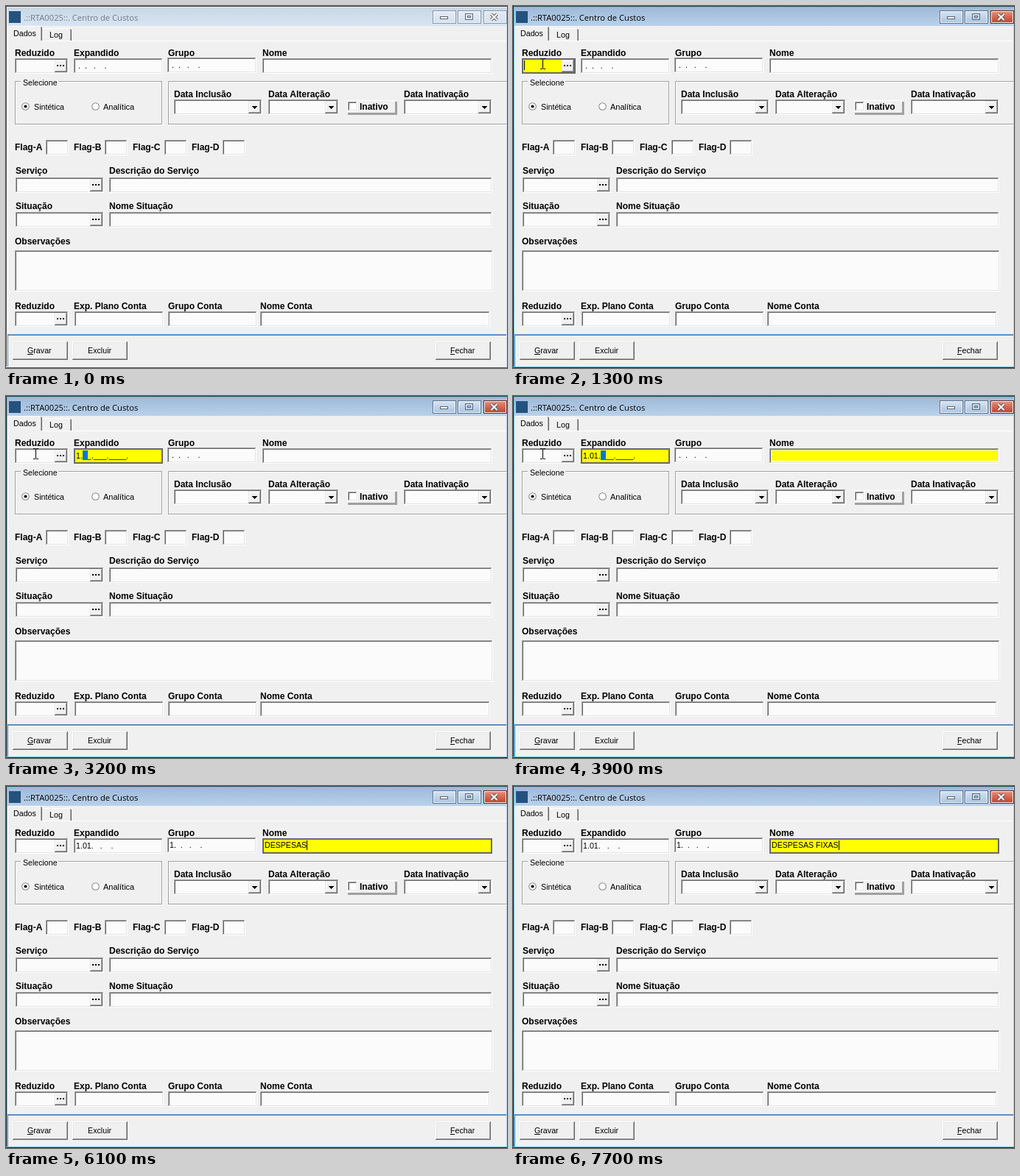
Animation of 680x492 px, one loop 8 s. Source, as an HTML page with a canvas:

```html
<!DOCTYPE html>
<html lang="pt">
<head>
<meta charset="utf-8">
<title>Centro de Custos</title>
<style>
html, body { margin: 0; width: 100%; height: 100%; overflow: hidden; background: #f0f0f0; }
canvas { display: block; }
</style>
</head>
<body>
<canvas id="stage" width="680" height="492"></canvas>
<script>
const ctx = document.getElementById('stage').getContext('2d');
const SANS = '"Liberation Sans", Arial, sans-serif';
const BOLD = `bold 12px ${SANS}`;
const PLAIN = `10.7px ${SANS}`;
const ENTRY = `10.6px ${SANS}`;
const TITLE = '11.2px "Open Sans", sans-serif';
const FACE = '#f0f0f0', PAPER = '#fbfbfb', YELLOW = '#ffff00', BLUE = '#0078d7';
const GREY = '#a0a0a0', DARK = '#696969', LIGHT = '#e3e3e3';

function box(x0, y0, x1, y1, color) {
  ctx.fillStyle = color;
  ctx.fillRect(x0, y0, x1 - x0, y1 - y0);
}

function text(str, x, y, font = BOLD, color = '#000') {
  ctx.font = font;
  ctx.fillStyle = color;
  ctx.fillText(str, x, y);
}

// One-pixel bevel ring: top/left in one colour, bottom/right in another.
function bevel(x0, y0, x1, y1, topLeft, bottomRight) {
  box(x0, y0, x1, y0 + 1, topLeft);
  box(x0, y0, x0 + 1, y1, topLeft);
  box(x0, y1 - 1, x1, y1, bottomRight);
  box(x1 - 1, y0, x1, y1, bottomRight);
}

function raised(x0, y0, x1, y1, outer = '#fff', inner = LIGHT) {
  box(x0, y0, x1, y1, FACE);
  bevel(x0, y0, x1, y1, outer, DARK);
  bevel(x0 + 1, y0 + 1, x1 - 1, y1 - 1, inner, GREY);
}

function field(x0, y0, x1, y1, { fill = PAPER, focus = false } = {}) {
  box(x0, y0, x1, y1, fill);
  bevel(x0, y0, x1, y1, focus ? DARK : GREY, focus ? DARK : '#fff');
  bevel(x0 + 1, y0 + 1, x1 - 1, y1 - 1, DARK, focus ? DARK : LIGHT);
}

// A field with a 17-pixel square button inside its right end.
function buttonField(x0, y0, x1, style) {
  field(x0, y0, x1, y0 + 21, style);
  raised(x1 - 19, y0 + 2, x1 - 2, y0 + 19, LIGHT, '#fff');
}

function lookup(x0, y0, x1, style) {
  buttonField(x0, y0, x1, style);
  for (let i = 0; i < 3; i++) box(x1 - 16 + i * 4, y0 + 9, x1 - 14 + i * 4, y0 + 11, '#000');
}

function combo(x0, x1) {
  buttonField(x0, 127, x1);
  for (let i = 0; i < 4; i++) box(x1 - 14 + i, 136 + i, x1 - 7 - i, 137 + i, '#000');
}

function etched(x0, y0, x1, y1) {
  ctx.lineWidth = 1;
  ctx.strokeStyle = '#fff';
  ctx.strokeRect(x0 + 1.5, y0 + 1.5, x1 - x0 - 2, y1 - y0 - 2);
  ctx.strokeStyle = GREY;
  ctx.strokeRect(x0 + .5, y0 + .5, x1 - x0 - 2, y1 - y0 - 2);
}

function radio(x, y, checked) {
  const disc = (r, color) => {
    ctx.beginPath();
    ctx.arc(x, y, r, 0, 7);
    ctx.fillStyle = color;
    ctx.fill();
  };
  disc(5.3, '#858585');
  disc(4.3, '#fff');
  if (checked) disc(2, '#000');
}

function button(x, label, textX, underline) {
  raised(x, 456, x + 75, 481);
  text(label, textX, 472, PLAIN);
  if (underline) box(textX, 473, textX + underline, 474, '#000');
}

function captionButton(x0, x1, color, border) {
  box(x0, 6, x1, 24, border);
  box(x0 + 1, 7, x1 - 1, 23, '#f3f7fb');
  const shade = ctx.createLinearGradient(0, 8, 0, 22);
  shade.addColorStop(0, color[0]);
  shade.addColorStop(1, color[1]);
  box(x0 + 2, 8, x1 - 2, 22, shade);
}

function cross(color, width) {
  ctx.strokeStyle = color;
  ctx.lineWidth = width;
  ctx.beginPath();
  ctx.moveTo(658.5, 11); ctx.lineTo(666.5, 19);
  ctx.moveTo(666.5, 11); ctx.lineTo(658.5, 19);
  ctx.stroke();
}

function drawWindow(active) {
  const [top, base] = active ? ['#9db9d8', '#b9d1ea'] : ['#c9d6e4', '#d7e4f2'];
  const glow = active ? '#58c8e4' : '#eef4fa';
  const edge = active ? '#2b2b2b' : '#565656';
  box(0, 0, 680, 492, FACE);
  const bar = ctx.createLinearGradient(0, 1, 0, 27);
  bar.addColorStop(0, top);
  bar.addColorStop(1, base);
  box(0, 0, 680, 27, bar);
  box(0, 0, 680, 1, '#404040');
  box(0, 1, 680, 2, glow);
  box(0, 1, 1, 492, edge);
  box(1, 2, 2, 490, glow);
  box(679, 2, 680, 490, base);
  box(0, 490, 680, 491, glow);
  box(0, 491, 680, 492, edge);

  box(4, 7, 20, 23, '#24527e');
  text('.::RTA0025::. Centro de Custos', 24, 20, TITLE, active ? '#000' : '#737c86');

  const face = active ? ['#d3e2f2', '#adc6e0'] : ['#e3ebf4', '#d5e1ee'];
  const border = active ? '#5d7188' : '#8795a5';
  captionButton(579, 611, face, border);
  captionButton(613, 645, face, border);
  captionButton(648, 680, active ? ['#e58a75', '#c5442d'] : face, active ? '#66241c' : border);
  box(589, 14, 600, 18, '#59636e');
  box(590, 15, 599, 17, '#fff');
  ctx.lineWidth = 1;
  ctx.strokeStyle = '#626c78';
  ctx.strokeRect(623.5, 10.5, 10, 8);
  ctx.strokeRect(626.5, 13.5, 4, 2);
  cross('#59535a', 4);
  cross('#fff', 2.2);
}

function drawForm() {
  // Tabs and page edges
  box(2, 47, 679, 48, '#fff');
  box(3, 28, 47, 48, FACE);
  box(4, 27, 47, 28, '#fff');
  box(2, 28, 3, 446, '#fff');
  box(48, 29, 49, 47, DARK);
  box(47, 28, 48, 47, GREY);
  box(49, 30, 87, 31, '#fff');
  box(88, 32, 89, 47, DARK);
  box(87, 31, 88, 47, GREY);
  text('Dados', 10, 41, PLAIN);
  text('Log', 59, 43, PLAIN);
  box(2, 446, 679, 448, '#5b8fc4');
  box(2, 448, 3, 490, '#5b8fc4');

  const labels = [
    ['Reduzido', 12, 68], ['Expandido', 92, 68], ['Grupo', 220, 68], ['Nome', 348, 68],
    ['Serviço', 13, 228], ['Descrição do Serviço', 140, 228],
    ['Situação', 13, 276], ['Nome Situação', 140, 276], ['Observações', 12, 324],
    ['Reduzido', 12, 412], ['Exp. Plano Conta', 92, 412],
    ['Grupo Conta', 220, 412], ['Nome Conta', 345, 412]
  ];

  etched(12, 102, 213, 162);
  box(20, 101, 71, 106, FACE);
  text('Selecione', 23, 108, ENTRY);
  radio(26.5, 136.5, true);
  radio(121.5, 136.5, false);
  text('Sintética', 38, 141, PLAIN);
  text('Analítica', 132, 141, `11px ${SANS}`);

  etched(220, 102, 690, 162);
  labels.push(['Data Inclusão', 228, 124], ['Data Alteração', 356, 124], ['Data Inativação', 540, 124]);
  combo(228, 348);
  combo(356, 452);
  combo(540, 660);
  box(463, 128, 531, 129, '#fff');
  box(463, 128, 464, 145, '#fff');
  box(464, 145, 531, 148, GREY);
  box(528, 130, 531, 148, GREY);
  field(464, 130, 477, 143, { fill: '#fff' });
  labels.push(['Inativo', 480, 141]);

  [54, 134, 215, 294].forEach((x, i) => {
    labels.push(['Flag-' + 'ABCD'[i], 12 + i * 80, 196]);
    field(x, 182, x + 31, 203);
  });
  for (const y of [233, 280]) {
    lookup(13, y, 133);
    field(140, y, 660, y + 21);
  }
  field(12, 332, 661, 388);
  lookup(12, 415, 85);
  field(93, 415, 214, 436);
  field(220, 415, 341, 436);
  field(345, 415, 657, 436);
  for (const [str, x, y] of labels) text(str, x, y);

  button(9, 'Gravar', 29, 8);
  button(90, 'Excluir', 111, 0);
  button(583, 'Fechar', 603, 6);
}

const BLANK = ' .  .   .    .';
// [time, text, x of the selected cell]
const maskSteps = [
  [0, BLANK], [2600, '_.__.___.____.', 95], [2700, '1.__.___.____.'],
  [3200, '1.__.___.____.', 104], [3300, '1.0_.___.____.', 110],
  [3600, '1.01.___.____.', 119], [4000, '1.01.   .    .']
];
const typingTimes = [4900, 5000, 5200, 5300, 5500, 5800, 5900, 6100, 6800, 7000, 7200, 7500, 7600, 7700];
const NAME = 'DESPESAS FIXAS';

const during = (t, from, to) => t >= from && t < to;

function caret(x) {
  box(Math.round(x), 74, Math.round(x) + 1, 87, '#000');
}

function drawEntries(t) {
  const inCode = during(t, 1200, 2100);
  lookup(12, 71, 85, { fill: inCode ? YELLOW : PAPER, focus: inCode });
  if (during(t, 1200, 1800)) caret(15);

  const inMask = during(t, 2100, 4000);
  field(92, 71, 213, 92, { fill: inMask ? YELLOW : PAPER, focus: inMask });
  const [, mask, selected] = maskSteps.filter(step => step[0] <= t).pop();
  text(mask, 95, 85, PLAIN);
  if (selected) box(selected, 74, selected + 7, 87, BLUE);

  field(219, 70, 340, 91);
  text(t < 4900 ? BLANK : '1' + BLANK.slice(1), 222, 84, PLAIN);

  const inName = t >= 4000;
  field(348, 71, 660, 92, { fill: inName ? YELLOW : PAPER, focus: inName });
  // The inner area is painted just before the border takes focus.
  if (t >= 3900) box(351, 74, 658, 88, YELLOW);
  const typed = NAME.slice(0, typingTimes.filter(time => time <= t).length);
  text(typed, 351, 84, ENTRY);
  const blinkedOff = during(t, 4400, 4900) || during(t, 6600, 6800);
  if (inName && !blinkedOff) caret(351 + ctx.measureText(typed).width);
}

function drawPointer() {
  box(40, 72, 41, 85, '#000');
  for (const y of [71, 85]) {
    box(37, y, 40, y + 1, '#000');
    box(41, y, 44, y + 1, '#000');
  }
}

function frame(now) {
  const t = now % 8000;
  drawWindow(t >= 1200);
  drawForm();
  drawEntries(t);
  if (during(t, 1100, 4900)) drawPointer();
  requestAnimationFrame(frame);
}
requestAnimationFrame(frame);
</script>
</body>
</html>
```
